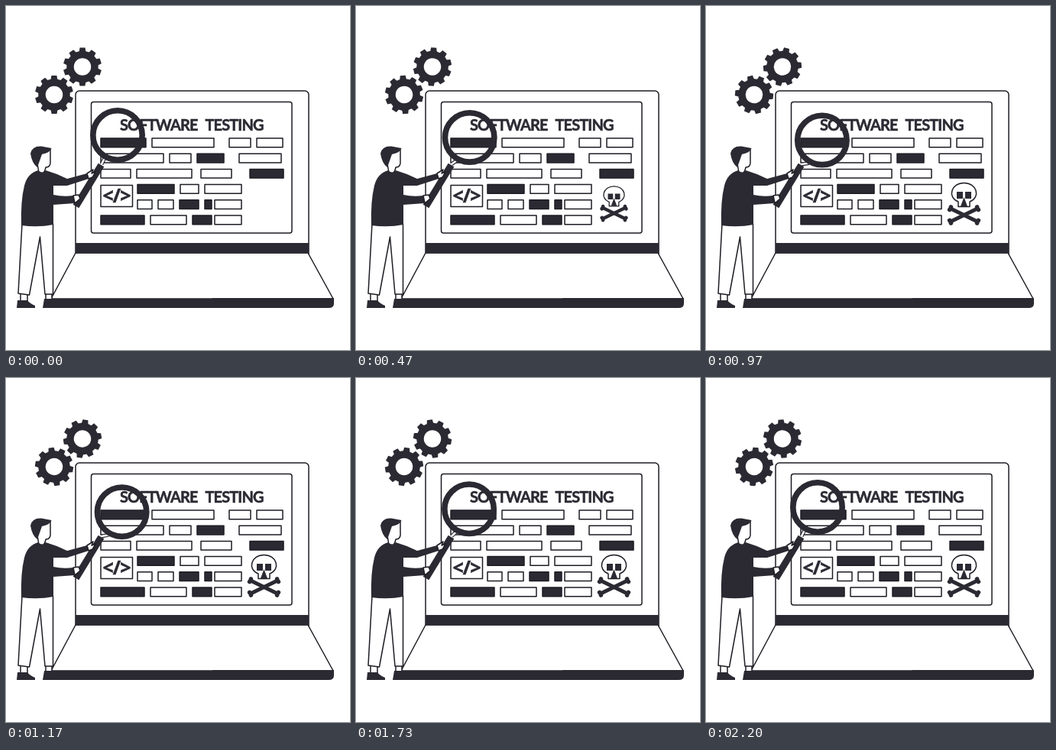
Write an HTML page that moves like this. It is 450 px wide and 450 px high and loops after 2.23 s.

```html
<!DOCTYPE html>
<html lang="en">
<head>
<meta charset="utf-8">
<title>Software testing</title>
<style>
  html, body { margin: 0; width: 100%; height: 100%; overflow: hidden; background: #fff; }
  svg { display: block; width: 100vw; height: 100vh; }
  .line { fill: #fff; stroke: #1e1d24; stroke-width: 1.5; stroke-linejoin: round; }
  .ink, .filled { fill: #2b2a33; }
  .stroke { fill: none; stroke: #2b2a33; }
  text { fill: #2b2a33; stroke: #2b2a33; stroke-width: .5; }
  .title { font: 700 20px Lato, sans-serif; letter-spacing: -.9px; }
  .code { font: 700 25px "Open Sans", sans-serif; letter-spacing: -1px; }
</style>
</head>
<body>
<svg viewBox="0 0 450 450">
  <g id="gears"></g>

  <g id="laptop">
    <rect class="line" x="91" y="111" width="305" height="230" rx="5"/>
    <rect class="line" x="111.5" y="125.5" width="262.5" height="171.5" rx="3"/>
    <path class="line" d="M91 323L59 383H428L395 323Z"/>
    <rect class="ink" x="91" y="310" width="305" height="13.5"/>
    <path class="ink" d="M50 383H270V382H429V389Q429 395 422 395H50Z"/>
  </g>

  <g id="bars"></g>
  <rect class="line" x="124" y="234.5" width="41.5" height="28"/>
  <text class="code" x="144.5" y="257" text-anchor="middle">&lt;/&gt;</text>
  <text class="title" x="149" y="163">SOFTWARE</text>
  <text class="title" x="260.5" y="163">TESTING</text>

  <g id="skull">
    <g id="bones"></g>
    <path class="line" d="M330 262.500V256C315 250 321 231.500 337.500 231.500S360 250 345 256V262.500Z"/>
    <path class="ink" d="M328 243H336V252H328ZM339 243H347V252H339ZM337.500 250L342 262H333Z"/>
  </g>

  <g id="man">
    <path class="line" d="M19 376V388H28V377M52 376V388H60V376"/>
    <path class="line" d="M21 285L16 376L30.500 378L44.500 302L51 377H61.500V285Z"/>
    <path class="ink" d="M15 385H28Q31 389 38 392V395H14ZM50 383H61L62 395H48Z"/>
    <path class="line" d="M40 200L43 218Q50 222 52 211Q59 211 58 202V188H42Z"/>
    <path class="ink" d="M32 193Q34 183 46 183.500L59.500 186Q59 191 47 194L41 211Q34 206 32 193Z"/>
    <path class="ink" d="M42 215Q48 220 52 215Q66 219 80 226L106 219L108 226L80 235L62 235V247Q75 250 88 248L90 258L62 260V286Q42 290 20 287Q19 255 24 235Q28 219 42 215Z"/>
  </g>

  <path class="stroke" stroke-width="9" d="M124.500 208L91.500 262"/>
  <path id="neck" class="stroke" stroke-width="5"/>
  <path id="neckFill" fill="none" stroke="#fff" stroke-width="2.6"/>
  <circle id="lens" class="stroke" cx="146" cy="169" r="32.200" stroke-width="7.600"/>

  <path class="line" d="M106 219L114 214L112 219L117 217L113 224L108 226Z"/>
  <path class="line" d="M88 248L95 247L97 252L90 258Z"/>
</svg>
<script>
  const LOOP = 2230;
  const $ = id => document.getElementById(id);
  const clamp = v => Math.min(1, Math.max(0, v));

  function add(parent, tag, attrs = {}) {
    const el = document.createElementNS('http://www.w3.org/2000/svg', tag);
    for (const key in attrs) el.setAttribute(key, attrs[key]);
    return parent.appendChild(el);
  }

  // Numbers are bar widths, * fills a bar, every space moves 4 px right.
  const lines = [
    '59*  81     28  34',
    '82  28  35*     55',
    '39  72   40      44*',
    '            48*  24  48',
    '            19  20  25*  9* 35',
    '57*  47  25* 35'
  ];
  lines.forEach((line, i) => {
    let x = 124;
    for (const [token] of line.matchAll(/ +|\S+/g)) {
      const width = parseInt(token) || 4 * token.length;
      if (token.trim()) {
        const bar = add($('bars'), 'rect', { class: 'line', x, y: 173 + 20.2 * i, width, height: 11.7 });
        if (token.endsWith('*')) bar.style.fill = '#2b2a33';
      }
      x += width;
    }
  });

  for (const angle of [-26, 26]) {
    const bone = add($('bones'), 'g', { transform: `translate(337.5 273.5) rotate(${angle})` });
    add(bone, 'path', { class: 'stroke', 'stroke-width': 5, d: 'M-20 0H20' });
    for (const x of [-20, 20]) {
      for (const y of [-2, 2]) add(bone, 'circle', { class: 'ink', cx: x, cy: y, r: 2.8 });
    }
  }

  function makeGear(x, y, turn) {
    const el = add($('gears'), 'g');
    add(el, 'circle', { class: 'stroke', r: 16, 'stroke-width': 9.5 });
    for (let i = 0; i < 10; i++) {
      add(el, 'path', { class: 'ink', d: 'M-4.5 -19L-3.5 -25H3.5L4.5 -19Z', transform: `rotate(${i * 36})` });
    }
    return { el, x, y, turn };
  }
  const gears = [makeGear(100, 79.5, 1), makeGear(63, 116, -1)];

  function draw(t) {
    for (const { el, x, y, turn } of gears) {
      el.setAttribute('transform', `translate(${x} ${y}) rotate(${turn * 360 * t / LOOP})`);
    }

    // The lens drifts out and back at constant speed.
    const shift = clamp(1 - Math.abs(t - 1050) / 1000);
    const dx = 6.4 * shift, dy = 7 * shift;
    $('lens').setAttribute('transform', `translate(${dx} ${dy})`);
    for (const id of ['neck', 'neckFill']) $(id).setAttribute('d', `M${129 + dx} ${199 + dy}L125 207`);

    const size = clamp((t - 50) / 500);
    $('skull').setAttribute('transform', `translate(337.5 258.5) scale(${size}) translate(-337.5 -258.5)`);
    $('skull').style.display = size ? '' : 'none';
  }

  const start = performance.now();
  function tick(now) {
    draw(Math.max(0, now - start) % LOOP);
    requestAnimationFrame(tick);
  }
  draw(0);
  requestAnimationFrame(tick);
</script>
</body>
</html>
```
